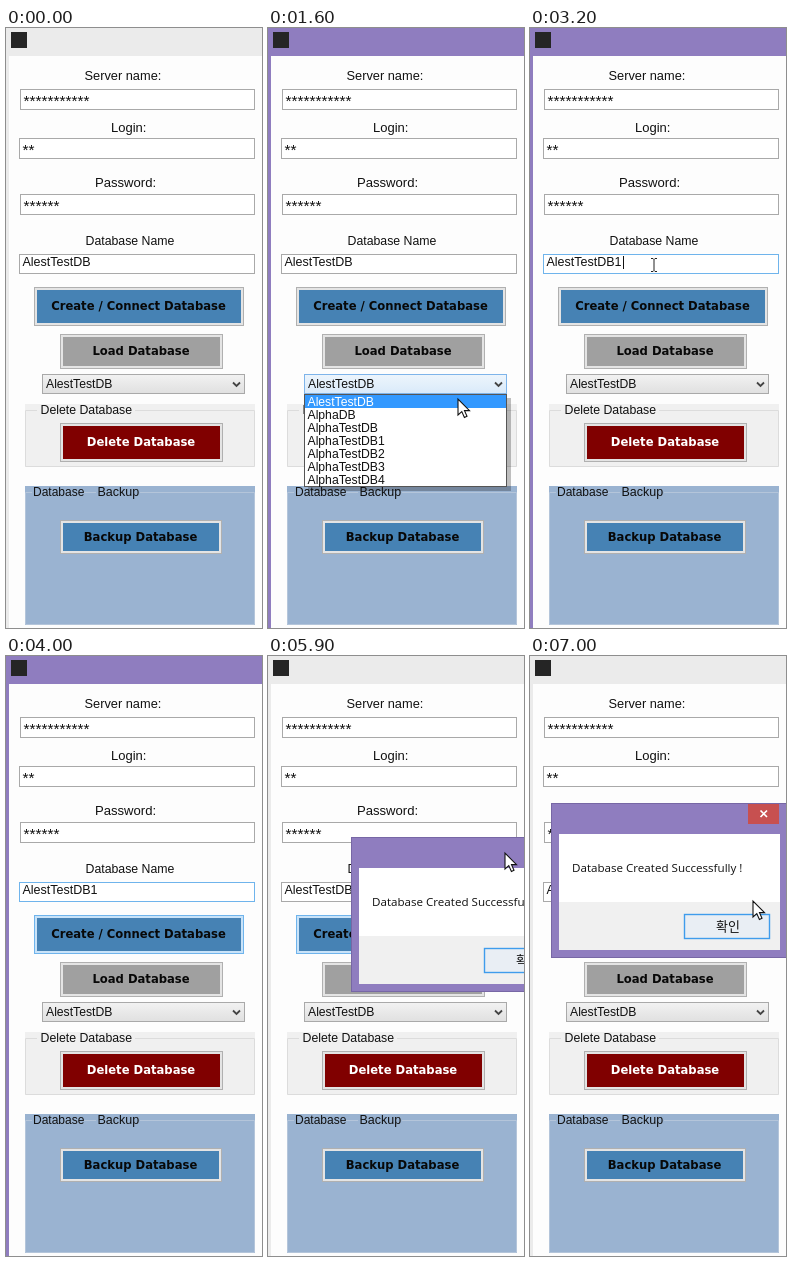
Recreate the animation shown at these times as an HTML page. Size 256x600 px, loop 7100 ms.

```html
<!DOCTYPE html>
<html lang="en">
<head>
<meta charset="utf-8">
<title>Database form</title>
<style>
html, body { margin: 0; width: 100%; height: 100%; overflow: hidden; background: #fdfdfd; }
svg { display: block; width: 256px; height: 600px; }
text { font-family: "Liberation Sans", Arial, sans-serif; font-size: 12.4px; fill: #111; white-space: pre; }
.bold { font-family: "DejaVu Sans", Verdana, sans-serif; font-size: 11.6px; font-weight: bold; text-anchor: middle; }
.stars { font-size: 15.4px; }
.note { font-family: "Open Sans", sans-serif; font-size: 11.6px; }
.ok { font-family: "Noto Sans CJK KR", "Noto Sans CJK", sans-serif; font-size: 13px; text-anchor: middle; }
</style>
</head>
<body>
<svg id="stage" viewBox="0 0 256 600"></svg>
<script>
const LOOP = 7100, STEP = 100;
const GREY = "#a9a9a9", BLUE = "#6fb4ec", PURPLE = "#8f7dbf";
const stage = document.getElementById("stage");

function add(tag, attrs, parent = stage, content = "") {
  const el = document.createElementNS("http://www.w3.org/2000/svg", tag);
  for (const key in attrs) el.setAttribute(key, attrs[key]);
  el.textContent = content;
  parent.appendChild(el);
  return el;
}
const set = (el, attrs) => { for (const key in attrs) el.setAttribute(key, attrs[key]); };
const show = (el, on) => el.setAttribute("visibility", on ? "visible" : "hidden");
const place = (el, [x, y]) => el.setAttribute("transform", `translate(${x} ${y})`);
const group = (parent = stage) => add("g", {}, parent);
const rect = (x, y, width, height, fill, parent) => add("rect", { x, y, width, height, fill }, parent);
const label = (x, y, text, size, parent) =>
  add("text", size ? { x, y, style: `font-size:${size}px` } : { x, y }, parent, text);

function frameBox(x, y, w, h, fill, stroke, parent) {
  const box = rect(x + .5, y + .5, w - 1, h - 1, fill, parent);
  set(box, { stroke });
  return box;
}

function gradient(id, top, bottom) {
  const el = add("linearGradient", { id, x2: 0, y2: 1 });
  add("stop", { "stop-color": top }, el);
  add("stop", { offset: 1, "stop-color": bottom }, el);
  return `url(#${id})`;
}

function button(x, y, w, h, fill, text, ink = "#080808") {
  const edge = frameBox(x, y, w, h, "#e4e4e4", "#b0b0b0");
  rect(x + 3, y + 3, w - 6, h - 6, fill);
  add("text", { x: x + w / 2 - .5, y: y + h / 2 + 3.5, class: "bold", style: `fill:${ink}` }, stage, text);
  return edge;
}

// Interpolates between [time, x, y] keys.
function along(keys, t) {
  const i = keys.findIndex(k => k[0] >= t);
  if (i < 0) return keys[keys.length - 1].slice(1);
  if (i === 0) return keys[0].slice(1);
  const [t0, x0, y0] = keys[i - 1], [t1, x1, y1] = keys[i];
  const p = (t - t0) / (t1 - t0);
  return [x0 + (x1 - x0) * p, y0 + (y1 - y0) * p];
}

// Window
const chrome = rect(0, 0, 256, 600, "#ebebeb");
rect(3, 28, 253, 572, "#fdfdfd");
rect(5, 4, 16, 16, "#252525");

// Form fields
label(78.5, 52, "Server name:", 12.8);
label(105, 104, "Login:", 13);
label(89, 159, "Password:", 13.1);
label(79.5, 217, "Database Name", 12.3);
[[14, 61, 235, 11], [13, 110, 236, 2], [14, 166, 235, 6]].forEach(([x, y, w, n]) => {
  frameBox(x, y, w, 21, "#fff", GREY);
  add("text", { x: x + 3.5, y: y + 16.5, class: "stars" }, stage, "*".repeat(n));
});
const nameField = frameBox(13, 226, 236, 20, "#fff", GREY);
const nameText = label(16.5, 238, "", 12.5);
const caret = rect(86, 228, 1, 13, "#111");

const createEdge = button(28, 259, 210, 39, "#4682b4", "Create / Connect Database");
button(54, 306, 163, 35, "#a0a0a0", "Load Database");

// Group boxes
rect(19, 376, 230, 63, "#f0f0f0");
add("path", { d: "M31 382.5H19.5V438.5H248.5V382.5H129", fill: "none", stroke: "#dcdcdc" });
label(34.5, 386, "Delete Database", 12.3);
button(54, 395, 163, 39, "#800000", "Delete Database", "#fff");
rect(19, 458, 230, 139, "#9ab3d1");
add("path", { d: "M26 464.5H19.5V596.5H248.5V464.5H134M78 464.5H90", fill: "none", stroke: "#b4c5da" });
label(27, 468, "Database", 12);
label(91.5, 468, "Backup", 12.5);
button(54, 492, 162, 34, "#4682b4", "Backup Database");

// Combo box and its list, which slides out from under it
const names = ["AlestTestDB", "AlphaDB", "AlphaTestDB", "AlphaTestDB1", "AlphaTestDB2", "AlphaTestDB3", "AlphaTestDB4"];
const ROW = 13, LIST = names.length * ROW + 2;
const plainFill = gradient("plain", "#f2f2f2", "#e0e0e0");
const hotFill = gradient("hot", "#edf5fc", "#d9eafa");
const clip = add("clipPath", { id: "drop" });
rect(30, 366, 220, 110, "#000", clip);
const dropArea = add("g", { "clip-path": "url(#drop)" });
const list = group(dropArea);
rect(40, 4, 203, LIST, "#000", list).setAttribute("opacity", .25);
frameBox(36, 0, 203, LIST, "#fff", "#555", list);
const marked = rect(37, 1, 201, ROW, "#3399ff", list);
const rows = names.map((name, i) => label(39.5, 11.5 + i * ROW, name, 12.2, list));
const combo = frameBox(36, 346, 203, 20, plainFill, GREY);
label(40, 360, "AlestTestDB", 12.2);
add("path", { d: "M227 354.5L230.5 358L234 354.5", fill: "none", stroke: "#444", "stroke-width": 1.8 });

// Message box
const dialog = group();
frameBox(0, 0, 237, 155, PURPLE, "#7767a5", dialog);
rect(8, 31, 221, 68, "#fff", dialog);
rect(8, 99, 221, 48, "#f0f0f0", dialog);
rect(197, 1, 31, 20, "#c75050", dialog);
add("path", { d: "M209.5 7.5L216 14M216 7.5L209.5 14", stroke: "#fff", "stroke-width": 1.7 }, dialog);
add("text", { x: 21, y: 69, class: "note" }, dialog, "Database Created Successfully !");
const okBox = frameBox(133, 111, 86, 25, "#e9eef4", "#3f9cec", dialog);
okBox.setAttribute("stroke-width", 1.4);
add("text", { x: 177, y: 127.5, class: "ok" }, dialog, "확인");

// Pointers
const arrow = add("path", { d: "M0 0V16L3.8 12.6L6.4 18.4L9 17.2L6.5 11.6H11.5Z", fill: "#fff", stroke: "#111", "stroke-width": 1.1 });
const beam = add("path", { d: "M-3 -6.5H-1L0 -5.5L1 -6.5H3M0 -5.5V5.5M-3 6.5H-1L0 5.5L1 6.5H3", fill: "none", stroke: "#222" });

const dialogPath = [[5700, 190, 248], [5900, 83, 181], [6000, 50, 161], [6100, 28, 151], [6200, 18, 146], [6300, 21, 147]];
const pointerPath = [
  [600, 262, 400], [1000, 214, 353], [1300, 214, 353], [1600, 190, 371], [1800, 168, 330], [2200, 124, 237],
  [3200, 124, 237], [3500, 150, 278], [3700, 192, 281], [4000, 262, 368]
];
const finishPath = [[6300, 175, 163], [6400, 185, 175], [6600, 230, 220], [6800, 226, 272], [7000, 223, 245]];

function draw(now) {
  const t = Math.floor((now % LOOP) / STEP) * STEP;
  const between = (a, b) => t >= a && t < b;

  const active = between(1000, 5000);
  chrome.setAttribute("fill", active ? PURPLE : "#ebebeb");

  const open = between(1000, 1700);
  const slide = Math.min(1, Math.max(0, (t - 1000) / 400));
  show(dropArea, open && slide > 0);
  place(list, [0, 366 + LIST * (slide - 1)]);
  const choosing = t >= 1400;
  show(marked, open && choosing);
  rows[0].style.fill = choosing ? "#fff" : "#111";
  const hot = between(900, 2000);
  set(combo, { stroke: hot ? "#7eb4ea" : GREY, fill: hot ? hotFill : plainFill });

  const typed = t >= 3000;
  nameText.textContent = typed ? "AlestTestDB1" : "AlestTestDB";
  nameField.setAttribute("stroke", between(2200, 5000) ? BLUE : GREY);
  caret.setAttribute("x", typed ? 93 : 86);
  show(caret, between(2200, 2700) || between(3000, 3500));
  set(createEdge, t >= 3500 ? { stroke: BLUE, fill: "#c9e3f9" } : { stroke: "#b0b0b0", fill: "#e4e4e4" });

  const box = along(dialogPath, t);
  show(dialog, t >= 5700);
  place(dialog, box);

  const overField = between(2200, 3300);
  const dragging = between(5700, 6300);
  const tip = dragging ? [box[0] + 154, box[1] + 16] : along(t < 5700 ? pointerPath : finishPath, t);
  place(arrow, tip);
  place(beam, tip);
  show(arrow, !overField && (between(600, 4000) || t >= 5700));
  show(beam, overField && !between(3000, 3200));
}

const start = performance.now();
function tick() {
  draw(performance.now() - start);
  requestAnimationFrame(tick);
}
tick();
</script>
</body>
</html>
```
